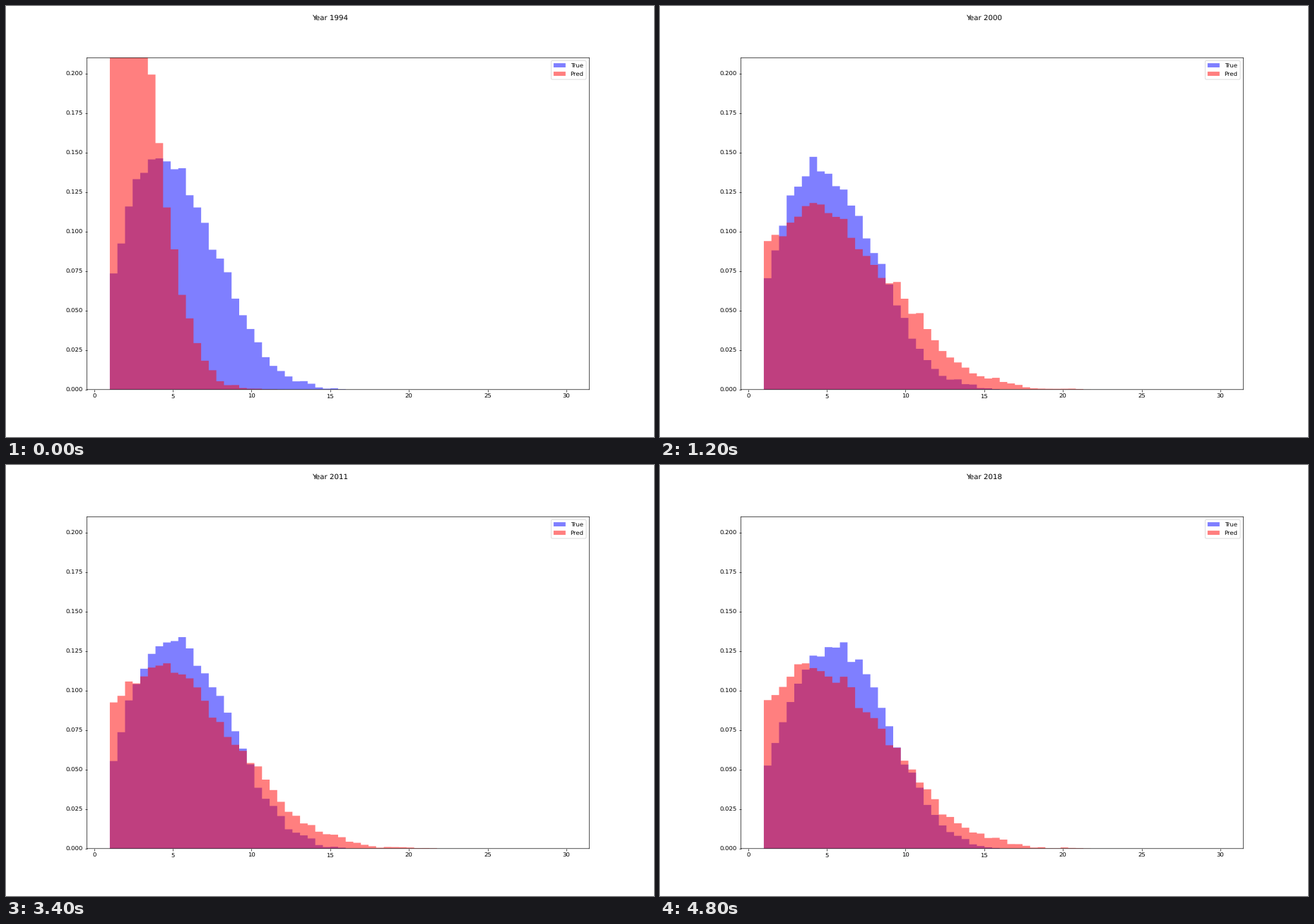
These frames come from a looping animation (917x611 px, 5 s). A matplotlib script:

```python
import numpy as np
import matplotlib.pyplot as plt
from matplotlib.animation import FuncAnimation

WIDTH, HEIGHT, DPI = 917, 611, 61.13
FIRST_YEAR, YEARS = 1994, 25
BINS = 60
edges = np.linspace(1, 30, BINS + 1)
centers = (edges[:-1] + edges[1:]) / 2

# Smooth outlines of the distributions, through a few key points.
KNOTS = [1.2, 2.7, 4.2, 5.6, 7.5, 9.5, 11, 12.5, 14.5, 16, 18, 22]


def outline(*heights):
    return np.interp(centers, KNOTS[:len(heights)], heights, right=0)


true_start = outline(0.071, 0.132, 0.149, 0.132, 0.094, 0.046, 0.017, 0.007, 0.001, 0)
true_end = outline(0.050, 0.096, 0.125, 0.129, 0.112, 0.066, 0.036, 0.0125, 0.002, 0)
pred_start = 0.49 * np.exp(-centers**2 / 15.1)
pred_settled = outline(0.090, 0.106, 0.117, 0.112, 0.086, 0.060, 0.043, 0.022,
                       0.010, 0.0055, 0.001, 0)


def blend(a, b, t):
    return a + (b - a) * t


def sampled(heights, rng):
    """Add the scatter of a finite sample, which grows with the square root."""
    return (heights + 0.009 * np.sqrt(heights) * rng.normal(size=BINS)).clip(0)


plt.rcParams.update({"path.snap": False, "text.hinting": "none"})
fig, ax = plt.subplots(figsize=((WIDTH + 1e-6) / DPI, (HEIGHT + 1e-6) / DPI), dpi=DPI)
fig.subplots_adjust(left=0.125, right=0.9, bottom=0.11, top=0.88)
title = fig.suptitle("", fontsize=12)


def add_histogram(color, label):
    return ax.stairs(np.zeros(BINS), edges, fill=True, color=color, alpha=0.5, label=label)


true_hist = add_histogram("blue", "True")
pred_hist = add_histogram("red", "Pred")
ax.set(xlim=(-0.45, 31.45), ylim=(0, 0.21),
       xticks=range(0, 31, 5), yticks=np.arange(9) * 0.025)
ax.legend(loc="upper right")


def update(frame):
    year = FIRST_YEAR + frame
    rng = np.random.default_rng(year)
    title.set_text(f"Year {year}")
    # The truth drifts steadily; the prediction settles almost at once.
    drift = frame / (YEARS - 1)
    settled = 1 - np.exp(-2.5 * frame)
    true_hist.set_data(sampled(blend(true_start, true_end, drift), rng))
    pred_hist.set_data(sampled(blend(pred_start, pred_settled, settled), rng))
    return title, true_hist, pred_hist


anim = FuncAnimation(fig, update, frames=YEARS, interval=200, repeat=True)
plt.show()
```
